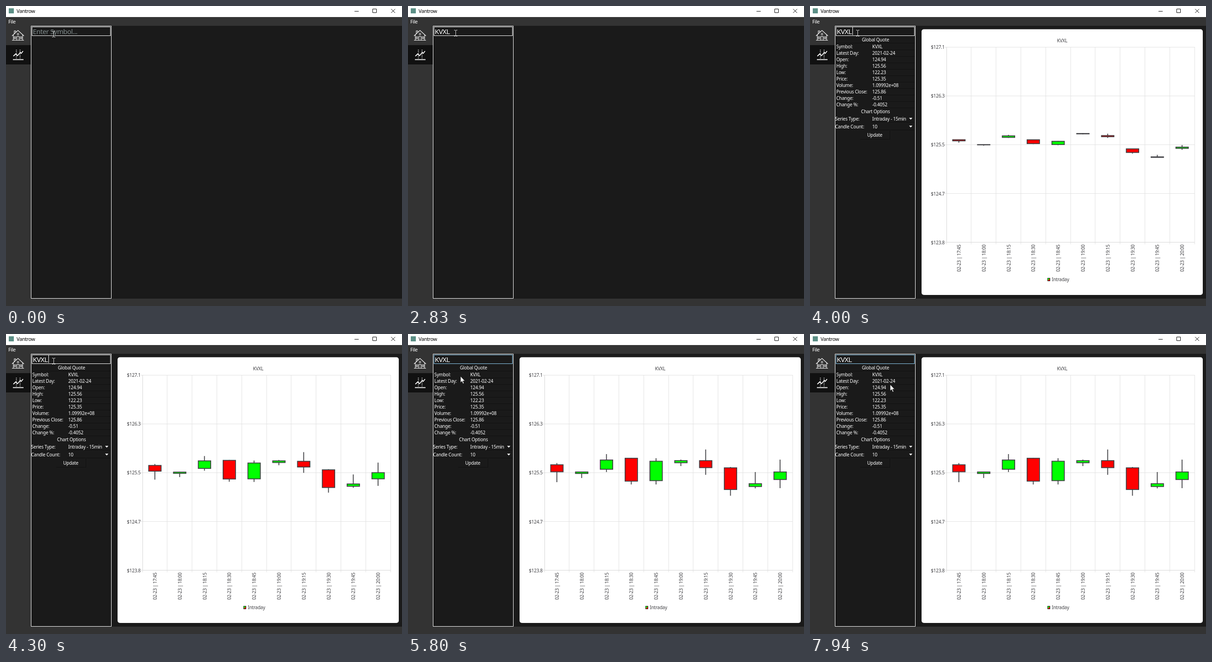
Write an HTML page that moves like this. It is 859 by 652 pixels and loops after 8 s.

```html
<!DOCTYPE html>
<html lang="en">
<head>
<meta charset="utf-8">
<title>Vantrow</title>
<style>
html, body { margin: 0; width: 100%; height: 100%; overflow: hidden; background: #333; }
svg { display: block; width: 859px; height: 652px; }
text { font: 10px "Noto Sans", "Open Sans", sans-serif; letter-spacing: -.025em; fill: #fff; white-space: pre; }
.chrome { font-size: 11px; letter-spacing: -.04em; }
.entry { font-size: 15px; letter-spacing: -.04em; }
#chart text { fill: #404044; }
.mid { text-anchor: middle; }
.end { text-anchor: end; }
.line { fill: none; stroke: #fff; }
.groove { fill: none; stroke: #111; }
</style>
</head>
<body>
<svg id="stage" viewBox="0 0 859 652"></svg>
<script>
const LOOP = 8000, SYMBOL = "KVXL", GREEN = "#0f0", RED = "#f00";
const stage = document.getElementById("stage");

const rect = (x, y, w, h, fill, extra = "") =>
  `<rect x="${x}" y="${y}" width="${w}" height="${h}" fill="${fill}" ${extra}/>`;
const path = (d, cls = "line", extra = "") => `<path d="${d}" class="${cls}" ${extra}/>`;
const label = (x, y, str, cls = "", extra = "") =>
  `<text x="${x}" y="${y}" class="${cls}" ${extra}>${str}</text>`;

function windowFrame() {
  return rect(0, 0, 859, 652, "#333") + rect(0, 0, 859, 24, "#fff") +
    rect(6, 5, 11, 11, "#5c8f86") +
    label(23, 15, "Vantrow", "chrome", 'style="fill:#000"') +
    path("M756 11.5h9M795.5 6.5h8v8h-8zM835.5 6.5l8.5 8.5m0-8.5l-8.5 8.5", "", 'fill="none" stroke="#000"') +
    label(5, 38, "File", "chrome") +
    rect(54, 43, 805, 593, "#1a1a1a") + rect(0, 85, 54, 42, "#111") +
    path("M13 65L26 53 39 65M16 63V74.5M36 63V74.5M13 74.5H39M18 60V54h3v3M23.5 74V66h5v8M18 67h3v4h-3zM31 67h3v4h-3z", "line", 'stroke-width="1.1"') +
    '<circle cx="26" cy="61" r="1.8" class="line"/>' +
    path("M16 109L21 104 25 108 31 101 33 103 37 98", "line", 'stroke-width="1.8"') +
    path("M22.5 95V114M30.5 95V114", "line", 'stroke-width="1.6" stroke-dasharray="1.6 2"') +
    path("M15 116.5H38", "line", 'stroke-width="1.8"') +
    path("M54.5 43.5H228.5V635.5H54.5Z");
}

function quotePanel() {
  const rows = [["Symbol:", SYMBOL], ["Latest Day:", "2021-02-24"], ["Open:", "124.94"],
    ["High:", "125.56"], ["Low:", "122.23"], ["Price:", "125.35"], ["Volume:", "1.09992e+08"],
    ["Previous Close:", "125.86"], ["Change:", "-0.51"], ["Change %:", "-0.4052"]];
  const combo = (y, name, value) => label(54.5, y, name) + label(135, y, value) +
    path(`M133 ${y + 3.5}H226`, "groove") +
    `<path d="M215 ${y - 6}h7l-3.5 4z" fill="#fff"/>`;
  return label(142, 77, "Global Quote", "mid") + path("M56 80.5H227", "groove") +
    rows.map(([name, value], i) => label(57, 92 + 14 * i, name) + label(135, 92 + 14 * i, value) +
      path(`M133 ${95.5 + 14 * i}H227`, "groove")).join("") +
    label(142, 233, "Chart Options", "mid") +
    combo(249, "Series Type:", "Intraday - 15min") + combo(266, "Candle Count:", "10") +
    path("M109 289.5H173.5V271", "groove") + label(140.5, 284, "Update", "mid");
}

const columnX = i => 296 + 53.8 * i;
const rowY = i => 89 + 106.2 * i;

function chartBackground() {
  let out = rect(242, 50.5, 610, 577.5, "#fff", 'rx="5"') + label(547, 79, SYMBOL, "mid");
  const grid = (d, color = "#e2e2e2") => path(d, "", `fill="none" stroke="${color}"`);
  const snap = v => Math.floor(v) + .5;
  for (let i = 0; i <= 10; i++) out += grid(`M${snap(columnX(i))} 89V518`);
  ["127.1", "126.3", "125.5", "124.7", "123.8"].forEach((price, i) => {
    out += grid(`M292 ${snap(rowY(i))}H834`) + label(292, rowY(i) + 4, "$" + price, "end");
  });
  out += grid("M296.5 89V513.5H834", "#d6d6d6");
  for (let i = 0; i < 10; i++) {
    const minutes = 17 * 60 + 45 + 15 * i;
    const clock = Math.floor(minutes / 60) + ":" + String(minutes % 60).padStart(2, "0");
    out += label(0, 0, "02-23 | " + clock, "end",
      `transform="translate(${columnX(i + .5) + 4} 518.5) rotate(-90)"`);
  }
  return out + rect(515, 591, 6, 7, RED) + `<path d="M515 591h6l-6 7z" fill="${GREEN}"/>` +
    path("M515.5 591.5h5v6h-5z", "", 'fill="none" stroke="#222"') + label(524.5, 598, "Intraday");
}

// Each candle: high, body top, body bottom, low, colour
const candles = [
  [280.5, 284.2, 299.5, 322, RED], [299, 299.8, 303.2, 313, GREEN],
  [261, 273.8, 294, 300, GREEN], [269, 270, 319.8, 327, RED],
  [270, 276.5, 318.7, 327, GREEN], [273, 275.2, 279.8, 287, GREEN],
  [251, 275.2, 290.5, 306, RED], [289, 290.8, 338, 351.5, RED],
  [300, 325.3, 331.5, 335.5, GREEN], [273, 299.8, 316.3, 335, GREEN]];

function drawCandles(growth) {
  return candles.map(([high, top, bottom, low, color], i) => {
    const x = columnX(i + .5), center = (top + bottom) / 2;
    const at = y => center + (y - center) * growth;
    return `<path d="M${x} ${at(high)}V${at(top)}M${x} ${at(bottom)}V${at(low)}"/>` +
      rect(x - 13.4, at(top), 27, at(bottom) - at(top), color);
  }).join("");
}

stage.innerHTML = windowFrame() +
  `<rect id="field" x="56.5" y="45.5" width="170" height="19" fill="#1a1a1a"/>
  <text id="entry" class="entry" x="58" y="60.5"></text>
  <rect id="caret" y="46" width="1" height="17" fill="#fff"/>
  <g id="quote">${quotePanel()}</g>
  <g id="chart">${chartBackground()}<g id="candles" stroke="#404044" stroke-width="1.8"></g></g>
  <path id="beam" d="M-3 -6.5H-1L.5 -5.5 2 -6.5H4M.5 -5.5V5.5M-3 6.5H-1L.5 5.5 2 6.5H4" class="line" stroke-opacity=".85"/>
  <path id="arrow" d="M0 0V13.5L3.1 10.6 5.4 16 7.4 15.1 5.1 9.9H9.3Z" fill="#fff" stroke="#111" stroke-width=".6"/>`;
const part = Object.fromEntries([...stage.querySelectorAll("[id]")].map(el => [el.id, el]));

const keyTimes = [1400, 1650, 1840, 2080];
const caretX = [58, 67, 77, 85, 92];
const caretFlips = [360, 850, 1350, 2830, 3950, 4430, 4940, 5500, 6030, 6530, 7030, 7550];
// Pointer stops: time, x, y
const stops = [[5500, 103, 59], [5800, 114, 92], [6270, 165, 280], [6500, 190, 309],
  [6800, 210, 250], [7110, 212, 162], [7570, 169.5, 110], [7820, 169.5, 110], [7940, 174, 110]];

function pointerAt(t) {
  if (t < 50) return [103, 61];
  const next = stops.findIndex(stop => stop[0] > t);
  if (next === 0) return stops[0].slice(1);
  if (next < 0) return stops[stops.length - 1].slice(1);
  const [t0, x0, y0] = stops[next - 1], [t1, x1, y1] = stops[next];
  const k = (t - t0) / (t1 - t0);
  return [x0 + (x1 - x0) * k, y0 + (y1 - y0) * k];
}

const show = (el, on) => el.setAttribute("visibility", on ? "visible" : "hidden");

function render() {
  const t = performance.now() % LOOP;
  const typed = keyTimes.filter(time => time <= t).length;
  part.entry.textContent = typed ? SYMBOL.slice(0, typed) : "Enter Symbol...";
  part.entry.style.fill = typed ? "#fff" : "#7d8888";
  part.caret.setAttribute("x", caretX[typed]);
  show(part.caret, caretFlips.filter(time => time <= t).length % 2);

  show(part.quote, t >= 3950);
  show(part.chart, t >= 4000);
  const progress = Math.min(1, Math.max(0, (t - 3956) / 1000));
  part.candles.innerHTML = drawCandles(1 - (1 - progress) ** 4);

  const [x, y] = pointerAt(t), outside = y > 65;
  part.field.setAttribute("stroke", outside ? "#8fd0f5" : "#fff");
  show(part.beam, !outside);
  show(part.arrow, outside);
  for (const cursor of [part.beam, part.arrow])
    cursor.setAttribute("transform", `translate(${Math.round(x)} ${Math.round(y)})`);
  requestAnimationFrame(render);
}
render();
</script>
</body>
</html>
```
